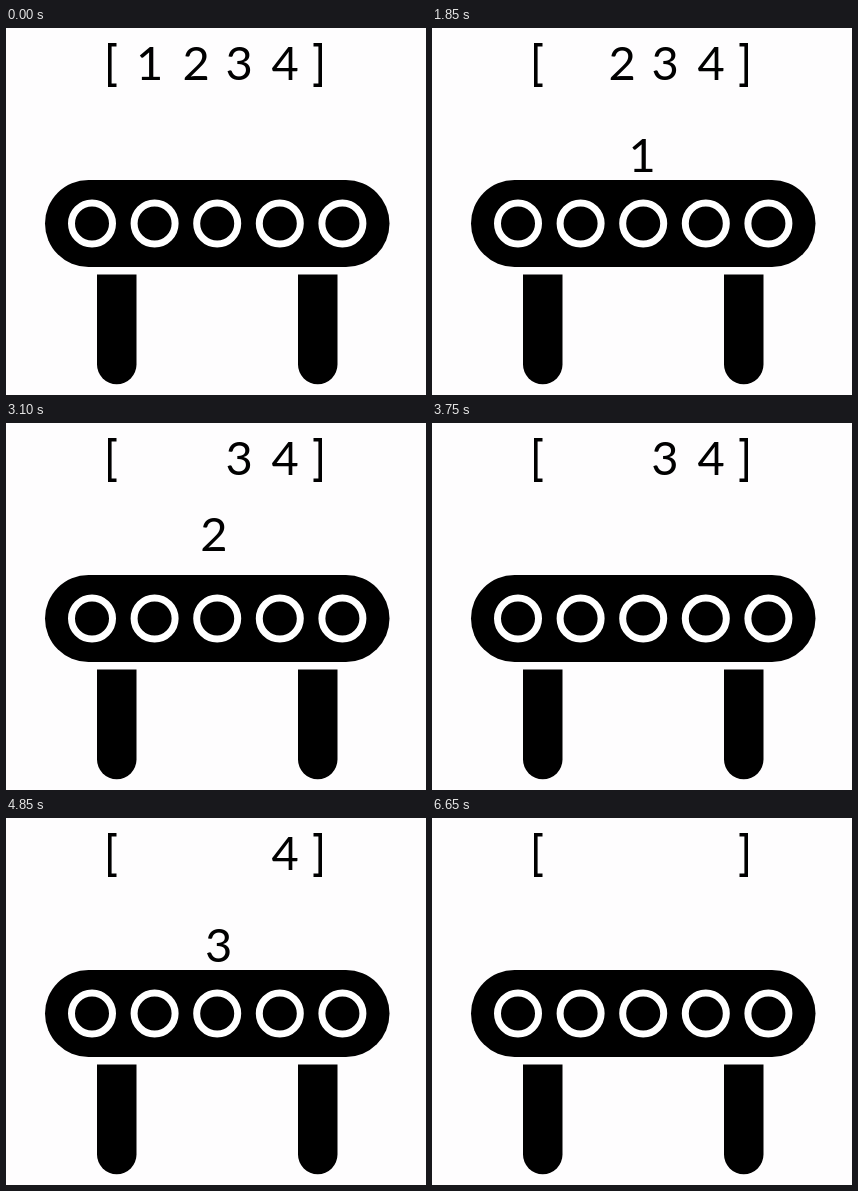
Animation, 420 px wide and 367 px high, one loop 7.25 s. Source, as an HTML page:

```html
<!DOCTYPE html>
<html lang="en">
<head>
<meta charset="utf-8">
<title>Array conveyor</title>
<style>
  html, body { margin: 0; width: 100%; height: 100%; overflow: hidden; background: #fefdfe; }
  svg { display: block; width: 420px; height: 367px; }
  text { font: 400 47px Lato, "Open Sans", sans-serif; text-anchor: middle; }
</style>
</head>
<body>
<svg viewBox="0 0 420 367">
  <g fill="none" stroke="#000" stroke-width="3.6">
    <path d="M110.5 16.8H103.8V57.2H110.5"/>
    <path d="M307.5 16.8H314.2V57.2H307.5"/>
  </g>
  <rect x="39" y="152" width="344.5" height="87" rx="43.5"/>
  <g id="rings" fill="none" stroke="#fff" stroke-width="7"></g>
  <path d="M91 246.5h39.5v90a19.75 19.75 0 0 1-39.5 0z"/>
  <path d="M292 246.5h39.5v90a19.75 19.75 0 0 1-39.5 0z"/>
  <g id="digits"></g>
</svg>
<script>
  const LOOP = 7250, TICK = 50, TRAVEL = 1450;
  const TOP = 51.5, DROP = 95, END_X = 212;
  const items = [
    { x: 143.5, start: 615, hide: 2100 },
    { x: 190, start: 2115, hide: 3650 },
    { x: 233, start: 3615, hide: 5150 },
    { x: 279, start: 5115, hide: 6650 }
  ];

  const add = (parent, tag, attrs) => {
    const el = document.createElementNS("http://www.w3.org/2000/svg", tag);
    for (const k in attrs) el.setAttribute(k, attrs[k]);
    return document.getElementById(parent).appendChild(el);
  };

  for (let i = 0; i < 5; i++) add("rings", "circle", { cx: 86 + 62.6 * i, cy: 195.5, r: 20.5 });

  items.forEach((item, i) => {
    item.el = add("digits", "text", {});
    item.el.textContent = i + 1;
  });

  const clamp = v => Math.min(1, Math.max(0, v));
  const ease = u => u * u * u * (10 - 15 * u + 6 * u * u);

  function draw(t) {
    for (const { el, x, start, hide } of items) {
      const p = ease(clamp((t - start) / TRAVEL));
      el.setAttribute("transform", `translate(${x + (END_X - x) * p} ${TOP + DROP * p})`);
      el.style.visibility = t < hide ? "visible" : "hidden";
    }
  }

  const origin = performance.now();
  function frame() {
    const t = Math.max(0, performance.now() - origin) % LOOP;
    draw(Math.floor(t / TICK) * TICK);
    requestAnimationFrame(frame);
  }
  draw(0);
  requestAnimationFrame(frame);
</script>
</body>
</html>
```
